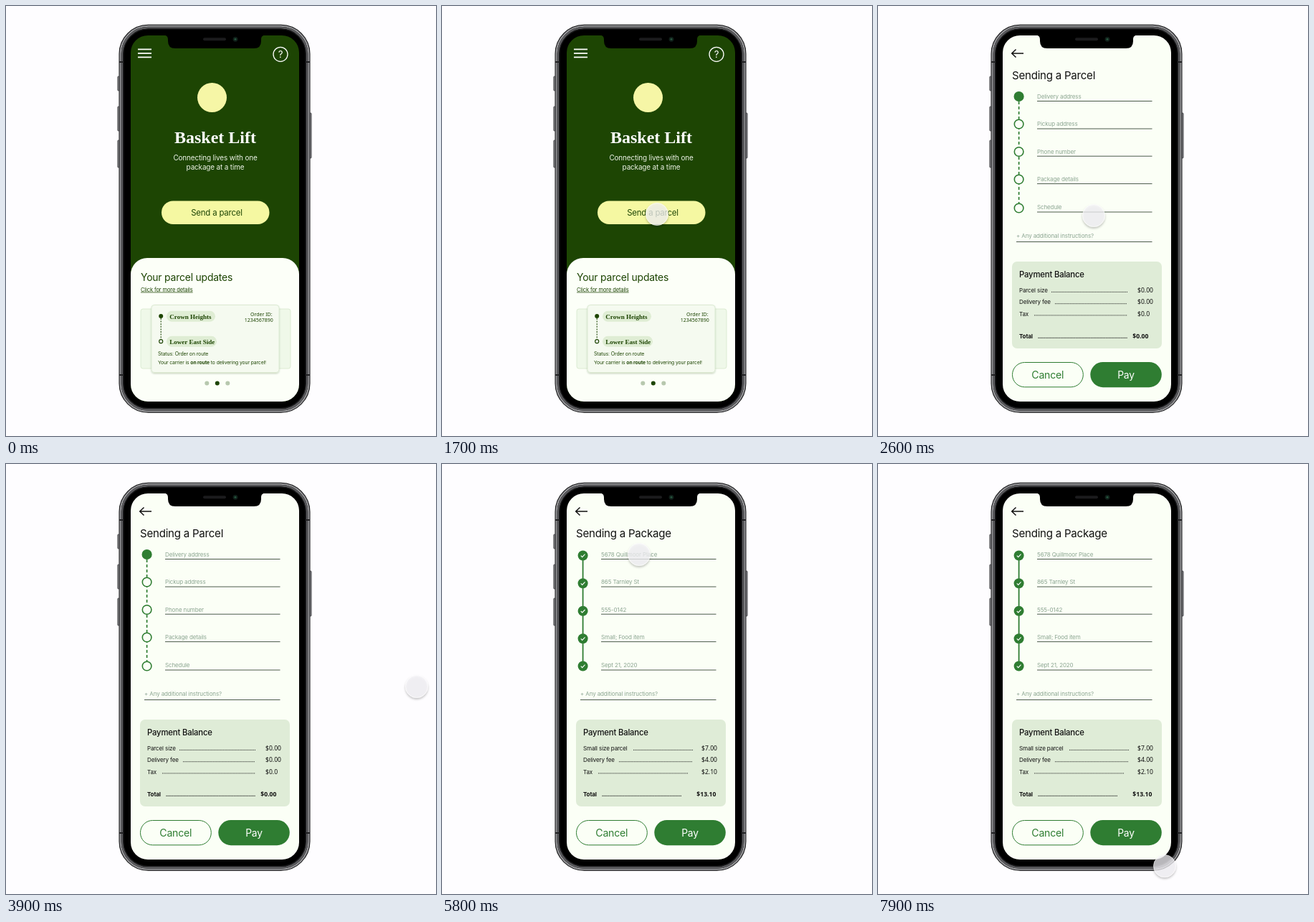
Write an HTML page that moves like this. It is 600x599 px and loops after 8 s.

```html
<!DOCTYPE html>
<html lang="en">
<head>
<meta charset="utf-8">
<title>Parcel app walkthrough</title>
<style>
  html, body { margin: 0; width: 100%; height: 100%; overflow: hidden; background: #fefdff; }
  svg { display: block; width: 600px; height: 599px; }
  text { font-family: Inter, "Liberation Sans", sans-serif; letter-spacing: -.015em; white-space: pre; }
  .serif { font-family: "Liberation Serif", serif; font-weight: 700; letter-spacing: 0; }
  .noto { font-family: "Noto Sans", sans-serif; letter-spacing: 0; }
  .bold { font-weight: 700; }
  .medium { font-weight: 500; }
  .mid { text-anchor: middle; }
  .end { text-anchor: end; }
  .under { text-decoration: underline; }
</style>
</head>
<body>
<svg viewBox="0 0 600 599" xmlns="http://www.w3.org/2000/svg">
  <defs>
    <clipPath id="glass"><rect x="174" y="41" width="235" height="510" rx="24"/></clipPath>
    <filter id="soft" x="-50%" y="-50%" width="200%" height="200%">
      <feDropShadow dx="0" dy="2" stdDeviation="1.4" flood-color="#000" flood-opacity=".3"/>
    </filter>
    <filter id="lift" x="-10%" y="-10%" width="120%" height="130%">
      <feDropShadow dx="0" dy="1.2" stdDeviation="1" flood-color="#1d4503" flood-opacity=".24"/>
    </filter>
  </defs>
  <g id="phone"></g>
  <g clip-path="url(#glass)">
    <g id="home"></g>
    <g id="empty"></g>
    <g id="filled"></g>
  </g>
  <g id="notch"></g>
  <g id="ring" fill="none">
    <circle r="41.3" stroke="#fff" stroke-width="3.8"/>
    <circle r="41.3" stroke="#0b0f14" stroke-width="2.3"/>
  </g>
  <g id="cursor">
    <circle r="15.5" fill="#f4f2f6" fill-opacity=".72" stroke="#fff" stroke-opacity=".6" filter="url(#soft)"/>
  </g>
</svg>
<script>
const $ = id => document.getElementById(id);
const DARK = '#1d4503', GREEN = '#2f7d32', PAPER = '#fbfff6';

const text = (x, y, size, fill, str, cls = '') =>
  `<text x="${x}" y="${y}" font-size="${size}" fill="${fill}" class="${cls}">${str}</text>`;
const box = (x, y, w, h, rx, fill, extra = '') =>
  `<rect x="${x}" y="${y}" width="${w}" height="${h}" rx="${rx}" fill="${fill}" ${extra}/>`;
const dot = (x, y, r, fill, extra = '') =>
  `<circle cx="${x}" cy="${y}" r="${r}" fill="${fill}" ${extra}/>`;
const path = (d, stroke, w, extra = '') =>
  `<path d="${d}" fill="none" stroke="${stroke}" stroke-width="${w}" ${extra}/>`;

function drawPhone() {
  const shell = (inset, stroke, w, fill = 'none') =>
    box(157.5 + inset, 25.8 + inset, 267 - 2 * inset, 541 - 2 * inset, 41 - inset, fill,
      `stroke="${stroke}" stroke-width="${w}"`);
  const keys = [[155.7, 98, 20], [155.7, 140, 34], [155.7, 187, 38], [423.4, 149, 63]];
  $('phone').innerHTML =
    keys.map(([x, y, h]) => box(x, y, 2.8, h, 1, '#858588', 'stroke="#343436" stroke-width=".6"')).join('') +
    shell(.6, '#262628', 1.3, '#000') + shell(2.1, '#a2a2a5', 1.8) +
    shell(4.4, '#59595c', 2.8) + shell(6.4, '#1c1c1e', 1.2) +
    [78, 514].map(y => path(`M158 ${y}h6M418 ${y}h6`, '#202022', 2)).join('');
  $('notch').innerHTML =
    '<path d="M218 40.5C224 40.5 226 42 226 47V49Q226 59 236 59H346Q356 59 356 49V47C356 42 358 40.5 364 40.5Z"/>' +
    box(275, 44.2, 32, 4, 2, '#1b1b1d') + dot(320, 46.3, 3.4, '#10201a') + dot(320, 46.3, 1.4, '#27573f');
}

function drawHome() {
  const edge = 'stroke="#d6e7cc" stroke-width=".8"';
  const step = (y, w, name) =>
    box(224, y - 7.5, w, 15, 7.5, '#dfedd4') + text(228.3, y + 3.3, 9, DARK, name, 'serif');
  $('home').innerHTML =
    box(174, 40, 235, 512, 0, DARK) +
    path('M184 60.4h19M184 65.9h19M184 71.4h19', '#fff', 1.6) +
    dot(383, 67.3, 10, 'none', 'stroke="#fff" stroke-width="1.3"') +
    text(383, 72, 13.2, '#fff', '?', 'mid') +
    dot(287.5, 127.5, 20.5, '#f6f6a6') +
    text(292, 191.3, 24, '#fff', 'Basket Lift', 'serif mid') +
    text(292, 215.4, 9.95, '#eef4e8', 'Connecting lives with one', 'mid') +
    text(292, 228.4, 9.95, '#eef4e8', 'package at a time', 'mid') +
    box(217, 271.5, 150.5, 32.5, 16.25, '#f5f8a2') +
    text(294, 292, 11.4, DARK, 'Send a parcel', 'mid') +
    box(174, 351, 235, 230, 23, '#fcfff8') +
    text(188, 383.2, 13.95, DARK, 'Your parcel updates') +
    text(188, 397.6, 7.5, DARK, 'Click for more details', 'under') +
    box(188, 422, 209, 83, 3, '#eff8e9', edge) +
    box(203, 416.5, 178, 94, 4, '#f5faf0', edge + ' filter="url(#lift)"') +
    path('M216.2 435v29', DARK, 1.1, 'stroke-dasharray="2 1.6"') +
    dot(216.2, 432, 3, DARK) + dot(216.2, 467.2, 2.5, '#fff', `stroke="${DARK}" stroke-width="1.2"`) +
    step(432.3, 68, 'Crown Heights') + step(467.3, 70, 'Lower East Side') +
    text(371.6, 432, 7, DARK, 'Order ID:', 'noto end') +
    text(372.8, 440.4, 7, DARK, '1234567890', 'noto end') +
    text(212, 487, 6.95, DARK, 'Status: Order on route') +
    text(212, 498.7, 6.8, DARK,
      'Your carrier is <tspan class="bold">on route</tspan> to delivering your parcel!') +
    dot(280.3, 525.6, 3, '#b7c8ae') + dot(294.8, 525.6, 3, DARK) + dot(309.3, 525.6, 3, '#b7c8ae');
}

const lineYs = [132.5, 171, 209.2, 247.6, 287];

// rows: [label, leader start, leader end, amount, baseline]
function drawForm(id, title, fields, nodes, rows) {
  const row = ([label, from, to, sum, y], i) => {
    const total = i === 3;
    return text(197, y, 8, '#111', label, total ? 'bold' : '') +
      path(`M${from} ${y - .6}H${to}`, '#222', total ? 1.3 : 1, 'stroke-dasharray="1.1 1"') +
      text(total ? 355.3 : 362, y, 8.6, '#111', sum, total ? 'noto bold' : 'noto');
  };
  $(id).innerHTML =
    box(174, 40, 235, 512, 0, PAPER) +
    path('M203 66H187M192.5 60.5L186.7 66L192.5 71.5', '#111', 1.5) +
    text(187, 102.2, 15.05, '#111', title) + nodes +
    fields.map((f, i) => text(222, lineYs[i] - 3.7, 8, '#8ba491', f) +
      path(`M222 ${lineYs[i]}H382.5`, '#4c5a4d', 1)).join('') +
    text(193, 323.2, 8, '#8ba491', '+ Any additional instructions?') +
    path('M193 328.5H382.5', '#4c5a4d', 1) +
    box(187, 356, 209, 121, 7, '#dfecd7') +
    text(197, 378.2, 11.3, '#111', 'Payment Balance', 'medium') +
    rows.map(row).join('') +
    box(187.5, 496.5, 98.8, 34.3, 17.1, PAPER, `stroke="${GREEN}"`) +
    text(236.8, 519, 14.1, GREEN, 'Cancel', 'mid') +
    box(296.3, 496, 99.5, 35.2, 17.6, GREEN) +
    text(346, 519, 13.8, '#fff', 'Pay', 'mid');
}

function drawForms() {
  const x = 196.6;
  const open = path(`M${x} 133V276`, GREEN, 1.7, 'stroke-dasharray="4 3"') +
    [126, 164.5, 203, 241.5, 281.5].map((y, i) =>
      dot(x, y, 6.3, i ? PAPER : GREEN, `stroke="${GREEN}" stroke-width="1.6"`)).join('');
  const done = path(`M${x} 128V281`, GREEN, 1.8) +
    [127.5, 166.2, 204.8, 243.2, 281.5].map(y => dot(x, y, 7, GREEN) +
      path(`M${x - 2.8} ${y + .2}l1.9 2l3.8 -4`, '#fff', 1.1)).join('');

  drawForm('empty', 'Sending a Parcel',
    ['Delivery address', 'Pickup address', 'Phone number', 'Package details', 'Schedule'], open, [
      ['Parcel size', 242, 348, '$0.00', 399],
      ['Delivery fee', 247, 347, '$0.00', 415.3],
      ['Tax', 218, 348, '$0.0', 431.5],
      ['Total', 223.5, 348, '$0.00', 463]
    ]);
  drawForm('filled', 'Sending a Package',
    ['5678 Quillmoor Place', '865 Tarnley St', '555-0142', 'Small; Food item', 'Sept 21, 2020'], done, [
      ['Small size parcel', 267, 350.5, '$7.00', 399],
      ['Delivery fee', 247, 349, '$4.00', 415.3],
      ['Tax', 218, 343.5, '$2.10', 431.5],
      ['Total', 223.5, 334, '$13.10', 463]
    ]);
}

const LOOP = 8000, TICK = 100;

// pointer path: [ms, x, y]
const way = [
  [100, 143, 563], [1100, 259, 318], [1600, 300, 290], [2500, 300.5, 290],
  [2600, 301, 292], [2900, 301, 292], [3700, 573, 310], [4500, 573, 310],
  [5000, 275, 133], [5300, 275, 126], [5800, 275, 126], [6300, 526, 300],
  [6600, 400, 565], [7000, 341, 503], [7300, 341, 503], [7800, 400, 560], [8000, 400, 560]
];
// presses: [start, end]
const presses = [[2300, 2600], [5500, 5700], [7100, 7300]];

function pointerAt(t) {
  const i = way.findIndex(k => k[0] > t);
  if (i < 1) return way[0].slice(1);
  const [a, ax, ay] = way[i - 1], [b, bx, by] = way[i];
  const u = (t - a) / (b - a), e = u * u * (3 - 2 * u);
  return [ax + (bx - ax) * e, ay + (by - ay) * e];
}

const show = (id, on) => $(id).setAttribute('visibility', on ? 'visible' : 'hidden');

function render(now) {
  const t = Math.floor(now % LOOP / TICK) * TICK;
  show('home', t < 2600);
  show('empty', t >= 2600 && t < 5700);
  show('filled', t >= 5700);

  const [x, y] = pointerAt(t);
  show('cursor', t >= 100 && !(t >= 6400 && t < 6600));
  $('cursor').setAttribute('transform', `translate(${x} ${y})`);

  const press = presses.find(([a, b]) => t >= a && t < b);
  $('cursor').setAttribute('opacity', press ? .5 : 1);
  show('ring', !!press);
  if (press) {
    const grow = .5 + .5 * (t - press[0]) / (press[1] - TICK - press[0]);
    $('ring').setAttribute('transform', `translate(${x} ${y}) scale(${grow})`);
  }
}

drawPhone();
drawHome();
drawForms();
const start = performance.now();
(function loop() {
  render(performance.now() - start);
  requestAnimationFrame(loop);
})();
</script>
</body>
</html>
```
